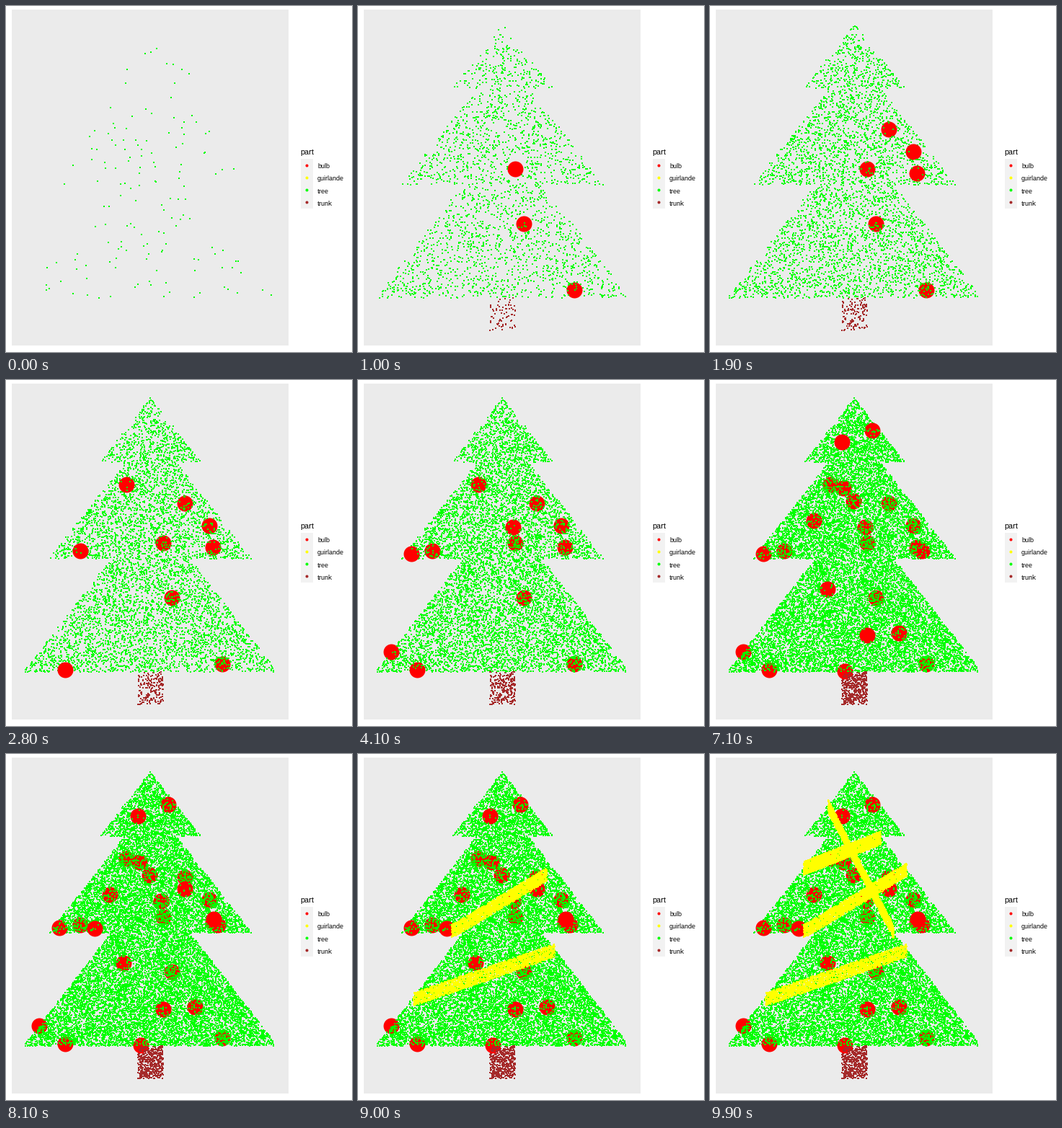
Write a matplotlib script that moves like this. It is 480 by 480 pixels and loops after 10 s.

```python
import numpy as np
import matplotlib.pyplot as plt
from matplotlib.animation import ArtistAnimation
from matplotlib.patches import Rectangle

plt.rcParams.update({"text.hinting": "native", "text.hinting_factor": 1})

FRAMES, STEP_MS = 100, 100
SIZE, DPI = 480, 96
PX = 72 / DPI  # points per pixel
RED, YELLOW, GREEN, BROWN = "#ff0000", "#ffff00", "#00ff00", "#a52a2a"

TREE_END = 82  # frames during which needles and trunk fill up
TREE_RATE, TRUNK_RATE = 230, 7
GARLAND_SPAN = 13 / 3
GARLAND_START = FRAMES - 1 - 4 * GARLAND_SPAN
GARLAND_DOTS, GARLAND_HEIGHT = 2400, 19

# bulb centres in order of appearance, one every BULB_GAP frames
BULB_START, BULB_GAP = 1.5, 3.3
BULBS = [
    (300, 394), (230, 302), (218, 226), (248, 171), (287, 232),
    (282, 202), (167, 145), (103, 237), (82, 402), (215, 204),
    (46, 377), (74, 241), (187, 404), (199, 168), (185, 150),
    (294, 237), (144, 195), (262, 351), (225, 70), (163, 290),
    (218, 354), (183, 86), (248, 187), (123, 242), (288, 229),
]

# upper edge of each garland, from its left to its right end
GARLANDS = [
    ((77, 331), (273, 263)),
    ((130, 237), (273, 151)),
    ((130, 149), (237, 107)),
    ((164, 63), (255, 238)),
]

rng = np.random.default_rng(24)

fig = plt.figure(figsize=(SIZE / DPI, SIZE / DPI), dpi=DPI, facecolor="white")
ax = fig.add_axes([0, 0, 1, 1])
ax.set(xlim=(0, SIZE), ylim=(SIZE, 0))
ax.axis("off")


def box(x, y, w, h, color):
    ax.add_patch(Rectangle((x, y), w, h, fc=color, lw=0, antialiased=False))


def dots(x, y, color, marker="s", size=2):
    line, = ax.plot(x, y, marker, color=color, ms=size * PX, mew=0,
                    antialiased=False)
    return line


def label(x, y, text, size):
    ax.text(x, y, text, fontsize=size * PX, family="Liberation Sans",
            color="black", va="baseline")


def half_width(y):
    """Half the width of the three stacked tiers at height y."""
    return np.interp(y, [24, 114, 114.01, 248, 248.01, 405],
                     [0, 70, 36, 140.5, 55, 176])


def needles(count):
    x = rng.uniform(24, 377, count * 4)
    y = rng.uniform(25, 405, count * 4)
    inside = np.abs(x - 200.5) < half_width(y)
    return x[inside][:count], y[inside][:count]


def bark(count):
    return rng.uniform(183, 218, count), rng.uniform(405, 450, count)


def garland_dots():
    """Progress (0 to 4) and position of every garland dot, left to right."""
    u = np.linspace(0, 4, 4 * GARLAND_DOTS, endpoint=False)
    ends = np.array(GARLANDS)[u.astype(int)]
    left, right = ends[:, 0], ends[:, 1]
    x, y = (left + (right - left) * (u % 1)[:, None]).T
    return u, x, y + rng.uniform(0, GARLAND_HEIGHT, u.size)


def draw_legend():
    label(408.5, 206, "part", 11)
    box(409, 212, 17, 69, "#f2f2f2")
    rows = [("bulb", RED), ("guirlande", YELLOW),
            ("tree", GREEN), ("trunk", BROWN)]
    for i, (name, color) in enumerate(rows):
        y = 220.5 + 17.28 * i
        dots([417], [y], color, "o", 4)
        label(432, y + 4.5, name, 9)


box(8, 5, 384, 466, "#ebebeb")
draw_legend()

progress, gx, gy = garland_dots()
bulb_frames = np.ceil(BULB_START + BULB_GAP * np.arange(len(BULBS)))
shown, frames = [], []
for f in range(FRAMES):
    if f < TREE_END:
        shown.append(dots(*needles(TREE_RATE if f else 150), GREEN))
        if f:
            shown.append(dots(*bark(TRUNK_RATE), BROWN))
        for k in np.flatnonzero(bulb_frames == f):
            shown.append(dots(*BULBS[k], RED, "o", 22))
    else:
        lo, hi = ((k - GARLAND_START) / GARLAND_SPAN for k in (f - 1, f))
        new = (progress >= lo) & (progress < hi)
        shown.append(dots(gx[new], gy[new], YELLOW))
    frames.append(list(shown))

anim = ArtistAnimation(fig, frames, interval=STEP_MS, repeat=True,
                       repeat_delay=0, blit=False)
plt.show()
```
